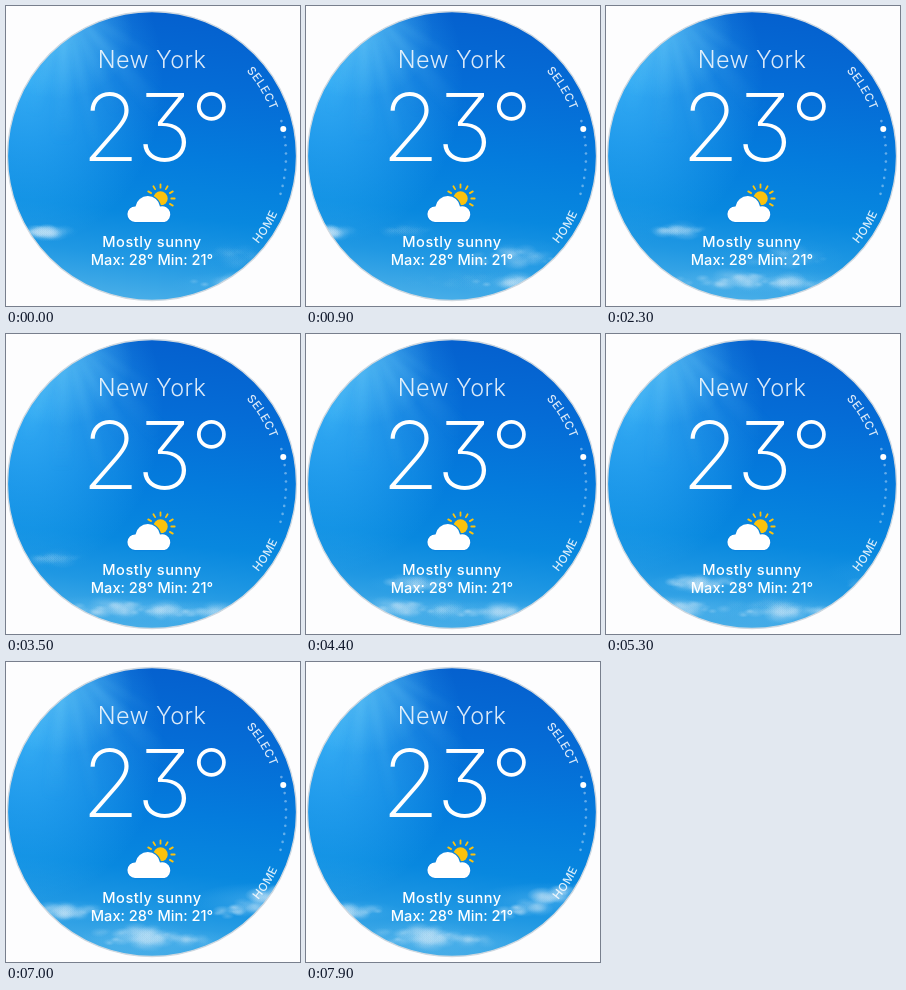
Animation of 294x300 px, one loop 8 s. Source, as an HTML page with a canvas:

```html
<!DOCTYPE html>
<html lang="en">
<head>
<meta charset="utf-8">
<title>Weather dial</title>
<style>
  html, body { margin: 0; width: 100%; height: 100%; overflow: hidden; background: #fdfdfe; }
  canvas, svg { position: absolute; left: 0; top: 0; width: 294px; height: 300px; }
  text { fill: #fff; font-family: Inter, "Open Sans", sans-serif; }
  .city { font-size: 23.5px; font-weight: 300; letter-spacing: .35px; text-anchor: middle; opacity: .85; }
  .temp { font-size: 94px; font-weight: 200; font-feature-settings: "cv09"; }
  .info { font-size: 14.6px; font-weight: 500; text-anchor: middle; }
  .side { font-size: 11.6px; font-weight: 500; letter-spacing: .5px; text-anchor: middle; opacity: .85; }
</style>
</head>
<body>
<canvas id="sky" width="294" height="300"></canvas>
<svg viewBox="0 0 294 300">
  <defs>
    <path id="up" d="M146 23A127 127 0 0 1 273 150"/>
    <path id="down" d="M146 288A138 138 0 0 0 284 150"/>
  </defs>
  <text class="city" x="146" y="62">New York</text>
  <text class="temp" x="75.5 130.5 184" y="155">23°</text>
  <g fill="none" stroke="#fdc20c" stroke-width="1.8" stroke-linecap="round">
    <circle cx="154.5" cy="192.5" r="7.2" fill="#fdc20c" stroke="none"/>
    <path id="rays"/>
  </g>
  <path fill="#fff" stroke="#0a84de" stroke-width="2.4" paint-order="stroke"
    d="M129 216A7.8 7.8 0 0 1 129.5 200.4A12.4 12.4 0 0 1 154 200.6A8 8 0 1 1 158.5 216Z"/>
  <text class="info" x="146" y="241" letter-spacing=".5">Mostly sunny</text>
  <text class="info" x="146" y="259">Max: 28° Min: 21°</text>
  <text class="side"><textPath href="#up" startOffset="65%">SELECT</textPath></text>
  <text class="side"><textPath href="#down" startOffset="64.5%">HOME</textPath></text>
  <g id="dots" fill="#fff"></g>
</svg>
<script>
const LOOP = 8000, CX = 146, CY = 150, R = 144.5, WIND = -20;
const ctx = document.getElementById('sky').getContext('2d');
const rad = d => d * Math.PI / 180;

function seeded(seed) {
  return () => (seed = (seed * 16807) % 2147483647) / 2147483647;
}

// Each bank: place at time `at` (s), half size, visible span (s), strength, tilt.
const banks = [
  { x: 42, y: 226, at: 0, w: 22, h: 4, from: -2, to: 2.6, a: .4 },
  { x: 235, y: 278, at: 0, w: 50, h: 6, from: -2, to: 5, a: .4 },
  { x: 205, y: 251, at: .9, w: 45, h: 9, from: -.4, to: 3, a: .35 },
  { x: 75, y: 225, at: 2.3, w: 25, h: 4, from: .6, to: 4, a: .3 },
  { x: 130, y: 274, at: 2.3, w: 60, h: 6, from: .8, to: 7, a: .5 },
  { x: 185, y: 279, at: 5.3, w: 62, h: 6, from: 2.5, to: 10, a: .5 },
  { x: 95, y: 249, at: 5.3, w: 38, h: 5, from: 3.5, to: 10, a: .5 },
  { x: 238, y: 238, at: 7.9, w: 50, h: 8, from: 4.8, to: 11, a: .7, tilt: -.35 },
  { x: 115, y: 272, at: 7.9, w: 42, h: 6, from: 5, to: 11, a: .45 }
].map((b, i) => {
  const rnd = seeded(911 + i * 577);
  b.puffs = Array.from({ length: 32 }, () => {
    const u = rnd() + rnd() - 1;
    return {
      x: u * b.w,
      y: (rnd() - .5) * 2 * b.h * (1 - Math.abs(u) * .6) + u * b.w * (b.tilt || 0),
      r: (4 + rnd() * 7) * (1 - Math.abs(u) * .45),
      a: .25 + rnd() * .4
    };
  });
  return b;
});

function glow(x, y, rx, ry, rgb, alpha) {
  ctx.save();
  ctx.translate(x, y);
  ctx.scale(1, ry / rx);
  const g = ctx.createRadialGradient(0, 0, 0, 0, 0, rx);
  g.addColorStop(0, `rgba(${rgb},${alpha})`);
  g.addColorStop(.45, `rgba(${rgb},${alpha * .55})`);
  g.addColorStop(1, `rgba(${rgb},0)`);
  ctx.fillStyle = g;
  ctx.fillRect(-rx, -rx, rx * 2, rx * 2);
  ctx.restore();
}

function drawRays(t) {
  const x = 58, y = -5;
  ctx.save();
  ctx.filter = 'blur(3px)';
  for (let i = 0; i < 8; i++) {
    const ang = rad(32 + i * 15 + 2 * Math.sin(t * .5 + i));
    const half = rad(2.2 + (i * 5 % 3));
    const len = 115 + (i * 37 % 60);
    const g = ctx.createRadialGradient(x, y, 10, x, y, len);
    g.addColorStop(0, `rgba(150,226,255,${.2 + .05 * Math.sin(t * .9 + i * 2)})`);
    g.addColorStop(1, 'rgba(100,205,255,0)');
    ctx.fillStyle = g;
    ctx.beginPath();
    ctx.moveTo(x, y);
    ctx.lineTo(x + len * Math.cos(ang - half), y + len * Math.sin(ang - half));
    ctx.lineTo(x + len * Math.cos(ang + half), y + len * Math.sin(ang + half));
    ctx.fill();
  }
  ctx.restore();
}

function drawBank(b, t) {
  const fade = Math.min(1, (t - b.from) / 1.4, (b.to - t) / 1.4);
  if (fade <= 0) return;
  const x = b.x + WIND * (t - b.at);
  glow(x, b.y, b.w * 1.4, b.h * 2.2, '120,200,244', b.a * fade * .5);
  for (const p of b.puffs) {
    glow(x + p.x, b.y + p.y, p.r * 1.5, p.r * .8, '200,228,246', p.a * b.a * fade);
  }
}

function draw(ms) {
  const t = ms / 1000;
  ctx.fillStyle = '#fdfdfe';
  ctx.fillRect(0, 0, 294, 300);

  ctx.save();
  ctx.beginPath();
  ctx.arc(CX, CY, R, 0, 7);
  ctx.clip();
  const g = ctx.createLinearGradient(172, 5, 140, 295);
  [[0, '#0560ce'], [.25, '#056cd6'], [.5, '#047cdd'], [.7, '#0888df'], [.85, '#2098e3'], [1, '#48aee8']]
    .forEach(([p, c]) => g.addColorStop(p, c));
  ctx.fillStyle = g;
  ctx.fillRect(0, 0, 294, 300);
  glow(22, 75, 135, 165, '70,195,255', .72);
  glow(52, 28, 75, 65, '120,220,255', .5);
  drawRays(t);
  banks.forEach(b => drawBank(b, t));
  ctx.restore();

  ctx.beginPath();
  ctx.arc(CX, CY, R, 0, 7);
  ctx.strokeStyle = '#cfd8e0';
  ctx.lineWidth = 1.3;
  ctx.stroke();
}

function addMarks() {
  let dots = '';
  for (let i = 0; i < 10; i++) {
    const a = rad(-15.1 + i * 3.5), on = i === 1;
    dots += `<circle cx="${CX + 134 * Math.cos(a)}" cy="${CY + 134 * Math.sin(a)}"
      r="${on ? 3 : 1.3}" opacity="${on ? 1 : .38}"/>`;
  }
  document.getElementById('dots').innerHTML = dots;
  let d = '';
  for (let i = 0; i < 7; i++) {
    const a = rad(-150 + i * 30), c = Math.cos(a), s = Math.sin(a);
    d += `M${154.5 + 10.8 * c} ${192.5 + 10.8 * s}L${154.5 + 14.2 * c} ${192.5 + 14.2 * s}`;
  }
  document.getElementById('rays').setAttribute('d', d);
}

addMarks();
const start = performance.now();
function tick() {
  const ms = (performance.now() - start) % LOOP;
  draw(Math.floor(ms / 100) * 100);
  requestAnimationFrame(tick);
}
tick();
</script>
</body>
</html>
```
